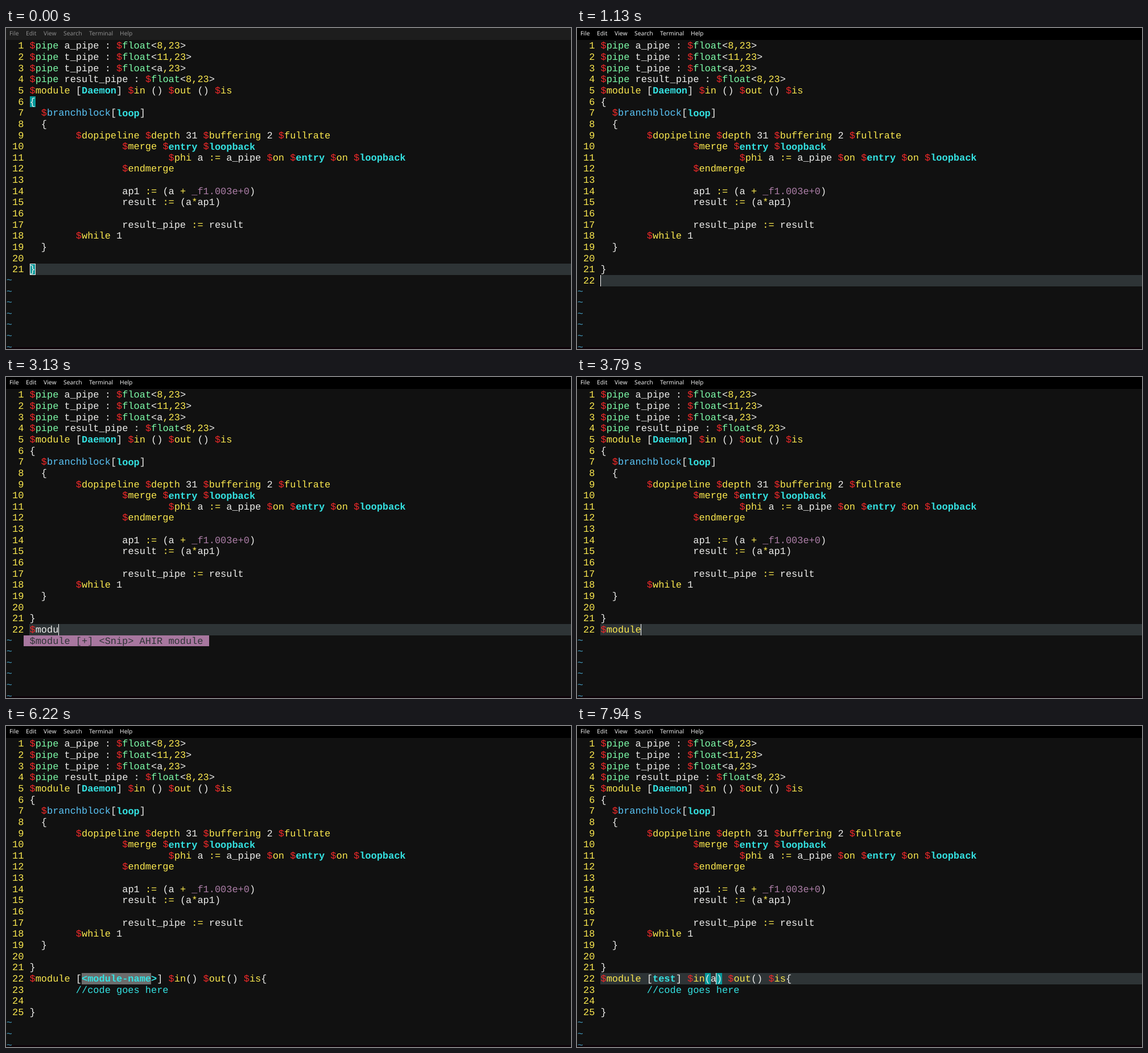
Write an HTML page that moves like this. It is 993x564 px and loops after 8 s.

```html
<!DOCTYPE html>
<html lang="en">
<head>
<meta charset="utf-8">
<title>Snippet completion in a terminal editor</title>
<style>
  html, body { margin: 0; width: 100%; height: 100%; overflow: hidden; background: #111; }
  #stage {
    position: relative; width: 993px; height: 564px; overflow: hidden; background: #111;
    font: 16.947px/19.65px "Liberation Mono", monospace;
    text-rendering: geometricPrecision; font-variant-ligatures: none;
  }
  #stage i { position: absolute; white-space: pre; font-style: normal; box-sizing: border-box; }
  #menu {
    position: absolute; left: 0; top: 0; width: 993px; height: 21px;
    font: 10.3px/20px "Noto Sans", "Open Sans", sans-serif;
  }
  #edge { position: absolute; left: 0; top: 561px; width: 993px; height: 3px; background: #0d0208; }
</style>
</head>
<body>
<div id="stage">
  <div id="edge"></div>
  <div id="menu"></div>
  <div id="fixed"></div>
  <div id="live"></div>
</div>
<script>
const LOOP = 8000, X0 = 41.5, Y0 = 21.4, CW = 10.17, RH = 19.65, LAST_ROW = 28;
const TEXT_DY = 1.9, BOLD_DY = 2.4, TILDE_DY = 0.8;
const C = {
  text: '#eeeeec', red: '#ef2929', yellow: '#fce94f', green: '#7dfba8', blue: '#5ac4f6',
  cyan: '#34e2e2', purple: '#ad7fa8', tilde: '#459fc4', dark: '#2e3436', teal: '#06989a',
  gray: '#6c6c6c', bg: '#111111'
};

const code = `$pipe a_pipe : $float<8,23>
$pipe t_pipe : $float<11,23>
$pipe t_pipe : $float<a,23>
$pipe result_pipe : $float<8,23>
$module [Daemon] $in () $out () $is
{
  $branchblock[loop]
  {
        $dopipeline $depth 31 $buffering 2 $fullrate
                $merge $entry $loopback
                        $phi a := a_pipe $on $entry $on $loopback
                $endmerge

                ap1 := (a + _f1.003e+0)
                result := (a*ap1)

                result_pipe := result
        $while 1
  }

}`.split('\n');

const menu = document.getElementById('menu');
const fixed = document.getElementById('fixed');
const live = document.getElementById('live');

const colX = col => X0 + col * CW;
const rowY = row => Y0 + (row - 1) * RH;

function add(parent, text, style) {
  const el = document.createElement('i');
  el.textContent = text;
  Object.assign(el.style, style);
  parent.append(el);
}

function put(parent, row, col, text, color, bold, dy = bold ? BOLD_DY : TEXT_DY) {
  add(parent, text, {
    left: colX(col) + 'px', top: rowY(row) + dy + 'px',
    color, fontWeight: bold ? 700 : 400
  });
}

function fill(row, x, w, color, border) {
  const top = Math.round(rowY(row));
  add(live, '', {
    left: x + 'px', top: top + 'px', width: w + 'px',
    height: Math.round(rowY(row + 1)) - top + 'px',
    background: color, border: border || 'none'
  });
}

// Text on a coloured background, laid over the code.
function box(row, col, text, color, bg, bold, border) {
  const x = Math.round(colX(col));
  fill(row, x, Math.round(colX(col + text.length)) - x, bg, border);
  put(live, row, col, text, color, bold);
}

const keywordStyle = word =>
  /^(pipe|float)$/.test(word) ? [C.green] :
  /^(entry|loopback)$/.test(word) ? [C.cyan, true] :
  word === 'branchblock' ? [C.blue] :
  /^(m|mo|mod|modu|modul)$/.test(word) ? [C.text] : [C.yellow];

const TOKEN = /(\/\/.*)|\$(\w*)|\[([^\]]+)|(_f\S+\+0)|(:=|[+*])|(\d*,\d+)|\w+|\S/g;

function codeLine(parent, row, line) {
  const num = String(row);
  put(parent, row, -1 - num.length, num, C.yellow);
  for (const m of line.matchAll(TOKEN)) {
    const [all, comment, keyword, name, float, op, pair] = m;
    const at = m.index;
    if (keyword !== undefined) {
      put(parent, row, at, '$', C.red);
      put(parent, row, at + 1, keyword, ...keywordStyle(keyword));
    } else if (name) {
      put(parent, row, at, '[', C.text);
      put(parent, row, at + 1, name, C.cyan, true);
    } else {
      put(parent, row, at, all,
        comment ? C.cyan : float ? C.purple : op || pair ? C.yellow : C.text);
    }
  }
}

const snippet = (name, arg = '') =>
  [`$module [${name}] $in(${arg}) $out() $is{`, '        //code goes here', '', '}'];
const blank = '<module-name>';
const snipMenu = [-1, ' $module [+] <Snip> AHIR module '];
const wordMenu = [8, ' test.gif    ~buf ', ' test2       ~buf ', ' testprog.aa ~buf '];

const typed = (text, popup) => ({ lines: [text], line: 22, bar: text.length, popup });
const named = (name, popup) =>
  ({ lines: snippet(name), line: 22, bar: 9 + name.length, popup });
const args = arg => ({
  lines: snippet('test', arg), line: 22, bar: 19 + arg.length,
  cells: [[22, 18, '(', C.text, C.teal], [22, 19 + arg.length, ')', C.text, C.teal]]
});
const selected = [22, 9, '<module-name', C.cyan, C.gray, true];
const brace = [6, 0, '{', C.text, C.teal];
const filled = [21, 0, '}', C.teal, C.text];

const steps = [
  [0, { line: 21, focus: 0, cells: [brace, [21, 0, '}', C.text, C.teal, false, '1px solid #eeeeec']] }],
  [400, { line: 21, focus: 0.5, cells: [brace, filled] }],
  [480, { line: 21, cells: [brace, filled] }],
  [1130, typed('')],
  [1710, typed('$')],
  [1910, typed('$m')],
  [1975, typed('$m', snipMenu)],
  [2260, typed('$mo')],
  [2330, typed('$mo', snipMenu)],
  [2400, typed('$mod')],
  [2470, typed('$mod', snipMenu)],
  [3080, typed('$modu')],
  [3130, typed('$modu', snipMenu)],
  [3540, typed('$modu')],
  [3790, typed('$module')],
  [3870, typed('$module', snipMenu)],
  [4360, { lines: snippet(blank), line: 22 }],
  [4440, { lines: snippet(blank), cells: [selected, [22, 21, '>', C.bg, C.cyan, true]] }],
  [6220, { lines: snippet(blank), cells: [selected] }],
  [6300, named('t')],
  [6370, named('te')],
  [6440, named('tes')],
  [6510, named('test')],
  [6590, named('test', wordMenu)],
  [7300, named('test')],
  [7380, args('')],
  [7940, args('a')]
];

const mix = (a, b, k) => `rgb(${Array(3).fill(Math.round(a + (b - a) * k))})`;

function draw({ lines = [], line, bar, popup, cells = [], focus = 1 }) {
  menu.style.background = mix(29, 0, focus);
  menu.style.color = mix(140, 236, focus);
  live.replaceChildren();
  if (line) fill(line, 41, 952, C.dark);
  lines.forEach((text, i) => codeLine(live, 22 + i, text));
  for (let row = 22 + lines.length; row <= LAST_ROW; row++) {
    put(live, row, -4, '~', C.tilde, false, TILDE_DY);
  }
  cells.forEach(cell => box(...cell));
  if (popup) {
    const [col, ...items] = popup;
    items.forEach((item, i) => box(23 + i, col, item, C.dark, '#a8779f'));
  }
  if (bar !== undefined) fill(22, Math.floor(colX(bar)), 1, '#fff');
}

[['File', 6], ['Edit', 35], ['View', 66], ['Search', 101], ['Terminal', 146], ['Help', 200]]
  .forEach(([label, x]) => add(menu, label, { left: x + 'px', top: 0 }));
code.forEach((text, i) => codeLine(fixed, i + 1, text));

const start = performance.now();
let shown;
function tick() {
  const t = (performance.now() - start) % LOOP;
  const step = steps.findLast(s => s[0] <= t);
  if (step !== shown) draw((shown = step)[1]);
  requestAnimationFrame(tick);
}
tick();
</script>
</body>
</html>
```
